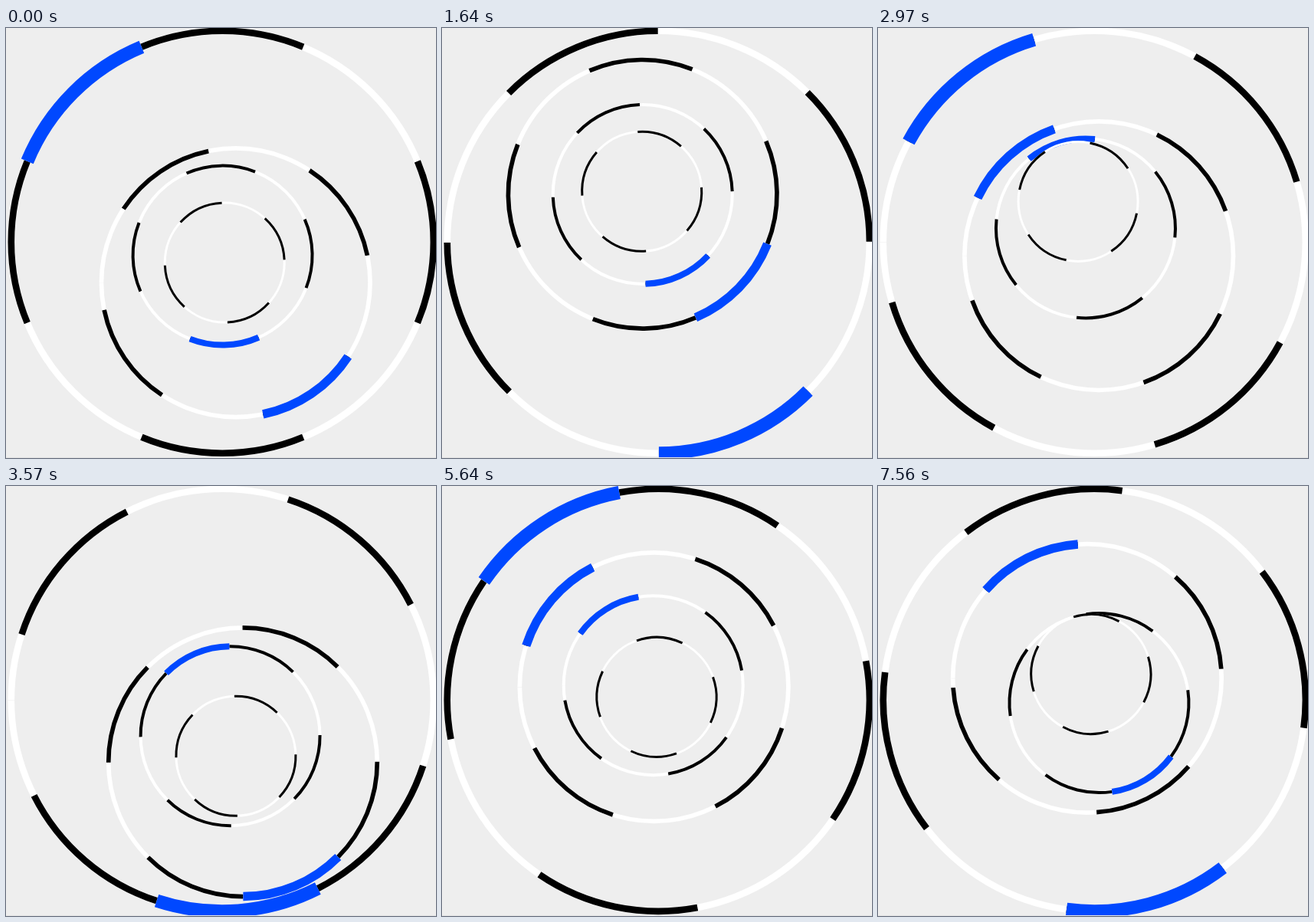
Write an HTML page with a canvas that moves like this. It is 561 px wide and 561 px high and loops after 7660 ms.

```html
<!DOCTYPE html>
<html lang="en">
<head>
<meta charset="utf-8">
<title>Bouncing rings</title>
<style>
html, body { margin: 0; width: 100%; height: 100%; overflow: hidden; background: #eee; }
canvas { display: block; }
</style>
</head>
<body>
<canvas id="stage" width="561" height="561"></canvas>
<script>
const ctx = document.getElementById('stage').getContext('2d');
const RAD = Math.PI / 180, SLOT = 45;
const LOOP = 7660, STEPS = 52, SPIN = -2.0573;
const SHORT_STEPS = [7, 15, 22, 30, 36, 38, 43, 48, 49];

// Angles in degrees, speeds per step. The travel of a ring inside its parent
// is counted in crossings: even ones go up from the bottom, odd ones go down.
const rings = [
  { r: 275.5, w: 8.6, spin: SPIN, phase: 90 },
  { r: 175.3, w: 5.7, spin: SPIN * 2.5, phase: 55.8, dir: 71.75, reach: 99.6, from: 1.78, rate: 0.0955 },
  { r: 117, w: 4, spin: SPIN * 5, phase: 88.8, dir: 64.27, reach: 58.4, from: 0.839, rate: 0.3327 },
  { r: 78, w: 3, spin: SPIN * 10, phase: 64.8, dir: 74.25, reach: 39.4, from: 0.375, rate: 0.5612 }
];

const stepStart = k => 150 * k - 10 * SHORT_STEPS.filter(s => s <= k).length;

function stepAt(ms) {
  let k = STEPS - 1;
  while (k > 0 && stepStart(k) > ms) k--;
  return k;
}

const angleAt = (ring, k) => ring.phase + ring.spin * k;

function travel(ring, k) {
  const crossings = ring.from + ring.rate * k;
  const n = Math.floor(crossings), part = crossings - n;
  const down = n % 2 === 1;
  return {
    offset: ring.reach * (down ? 2 * part - 1 : 1 - 2 * part),
    hitAngle: ring.dir + (down ? 180 : 0),
    hitStep: k - part / ring.rate
  };
}

function arc(x, y, r, mid, span, width, color) {
  ctx.beginPath();
  ctx.arc(x, y, r, (mid - span / 2) * RAD, (mid + span / 2) * RAD);
  ctx.lineWidth = width;
  ctx.strokeStyle = color;
  ctx.stroke();
}

function draw(k) {
  ctx.fillStyle = '#eee';
  ctx.fillRect(0, 0, 561, 561);
  let x = 282.3, y = 279.3;
  rings.forEach((ring, i) => {
    const angle = angleAt(ring, k);
    arc(x, y, ring.r, 0, 360, ring.w, '#fff');
    for (let q = 0; q < 4; q++) arc(x, y, ring.r, angle + q * 90, SLOT, ring.w, '#000');

    const child = rings[i + 1];
    if (!child) return;
    // Light the slot the child struck last.
    const move = travel(child, k);
    const slot = Math.round((move.hitAngle - angleAt(ring, move.hitStep)) / SLOT);
    arc(x, y, ring.r, angle + slot * SLOT, SLOT, ring.w * 2, '#0048ff');
    x += move.offset * Math.cos(child.dir * RAD);
    y += move.offset * Math.sin(child.dir * RAD);
  });
  ctx.fillStyle = '#e2e2e2';
  ctx.fillRect(0, 560, 561, 1);
}

const begin = performance.now();
function frame() {
  draw(stepAt((performance.now() - begin) % LOOP));
  requestAnimationFrame(frame);
}
frame();
</script>
</body>
</html>
```
